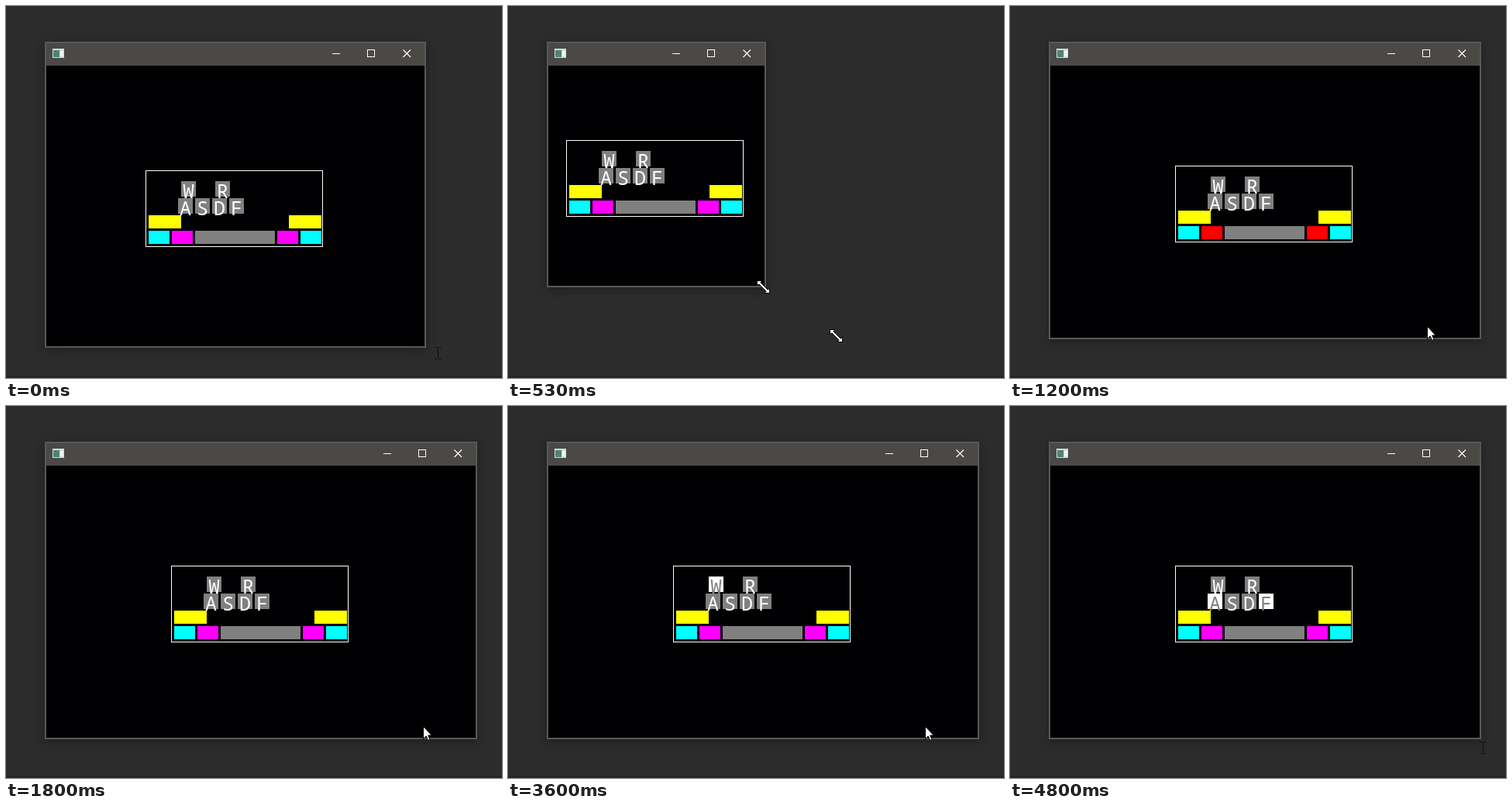
These frames come from a looping animation (640x480 px, 4860 ms). An HTML page:

```html
<!DOCTYPE html>
<html lang="en">
<head>
<meta charset="utf-8">
<title>Key display</title>
<style>
html, body { margin: 0; width: 100%; height: 100%; overflow: hidden; background: #2c2c2c; }
#stage { position: absolute; left: 0; top: 0; width: 640px; height: 480px; overflow: hidden; background: #2c2c2c; }
#strip { position: absolute; left: 0; top: 477px; width: 640px; height: 3px; background: #2a2527; }
#win { position: absolute; left: 50px; top: 46px; box-sizing: border-box; border: 2px solid #585858; background: #000002; box-shadow: 0 3px 13px rgba(0, 0, 0, .32); }
#bar { position: absolute; left: 0; right: 0; top: 0; height: 29px; background: #4a4945; }
#bar svg { position: absolute; top: 0; }
#icon { left: 0; }
#buttons { right: 0; fill: none; stroke: #fff; }
#panel { position: absolute; width: 229px; height: 99px; box-shadow: inset 0 0 0 1px #fff; }
.key { position: absolute; background: var(--up); color: #fff; text-align: center; white-space: pre;
  font: 500 25px/20px "Noto Sans Mono", "DejaVu Sans Mono", monospace; }
.key span { position: absolute; left: -5px; right: -5px; top: 2px; }
.key.down { background: var(--down); color: #808080; }
.cursor { position: absolute; left: 0; top: 0; width: 1px; height: 1px; overflow: visible; visibility: hidden; }
</style>
</head>
<body>
<div id="stage">
  <div id="strip"></div>
  <div id="win">
    <div id="bar">
      <svg id="icon" width="30" height="29" shape-rendering="crispEdges">
        <rect x="8" y="7" width="15" height="12" fill="#d4d8d8"/>
        <rect x="9" y="9" width="8" height="9" fill="#4c8478"/>
        <rect x="18" y="10" width="4" height="7" fill="#f2f2f2"/>
      </svg>
      <svg id="buttons" width="120" height="29">
        <path d="M1 13.5h10M46.5 8.5h9v9h-9z" shape-rendering="crispEdges"/>
        <path d="M92.5 8.5l9.5 9.5M102 8.5l-9.5 9.5" stroke-width="1.2"/>
      </svg>
    </div>
    <div id="panel"></div>
  </div>
  <svg class="cursor" id="beam">
    <path d="M-3.5-7.5h3M1.5-7.5h3M.5-7v14M-3.5 7.5h3M1.5 7.5h3" fill="none" stroke="#0c0c0c"/>
  </svg>
  <svg class="cursor" id="arrow">
    <path d="M.5.5v16l3.7-3.6 2.5 5.6 2.4-1-2.4-5.5h4.6z" fill="#fff" stroke="#000"/>
  </svg>
  <svg class="cursor" id="size">
    <path id="diag" d="M-8-8h6.5l-2.2 2.2 9.5 9.5L8 1.5V8H1.5l2.2-2.2-9.5-9.5L-8-1.5z" fill="#fff" stroke="#000"/>
  </svg>
  <svg class="cursor" id="trail">
    <use href="#diag"/>
  </svg>
</div>
<script>
const LOOP = 4860;
const $ = id => document.getElementById(id);

// name, x, y, width, height, colour up, colour down
const GREY = '#808080', WHITE = '#fff';
const letter = (name, x, y) => [name, x, y, 19, 20, GREY, WHITE];
const layout = [
  letter('W', 46, 14), letter('R', 90, 14),
  letter('A', 42, 36), letter('S', 64, 36), letter('D', 86, 36), letter('F', 108, 36),
  ...[4, 185].map(x => ['shift', x, 58, 42, 17, '#ff0', '#0f0']),
  ...[4, 200].map(x => ['ctrl', x, 78, 27, 17, '#0ff', '#00f']),
  ...[34, 170].map(x => ['alt', x, 78, 27, 17, '#f0f', '#f00']),
  ['space', 64, 78, 103, 17, GREY, WHITE]
];

const keys = layout.map(([name, x, y, w, h, up, down]) => {
  const el = document.createElement('div');
  el.className = 'key';
  el.style.cssText = `left:${x}px;top:${y}px;width:${w}px;height:${h}px;--up:${up};--down:${down}`;
  if (name.length === 1) {
    const label = document.createElement('span');
    label.textContent = name;
    el.append(label);
  }
  $('panel').append(el);
  return { name, el };
});

// time, keys held
const held = [
  [0, ''], [1200, 'alt'], [1330, 'ctrl'], [1400, ''], [1600, 'ctrl'], [1660, 'alt'], [1800, ''],
  [1860, 'space'], [1930, ''], [2000, 'space'], [2060, ''], [2130, 'space'], [2200, ''],
  [2330, 'shift'], [2400, ''], [2460, 'shift'], [2600, ''],
  [3000, 'A'], [3060, 'S'], [3130, ''],
  [3330, 'A'], [3400, 'S'], [3460, 'D'],
  [3600, 'W'], [3660, 'A'], [3730, 'S'], [3800, ''],
  [4000, 'R'], [4200, ''], [4330, 'F'], [4400, ''], [4530, 'A'], [4600, 'A F'], [4660, ''],
  [4730, 'A'], [4800, 'A F']
];

// time, right edge, bottom edge
const sizes = [
  [0, 542, 441], [400, 503, 441], [460, 426, 427], [530, 333, 363], [600, 352, 358],
  [660, 432, 390], [730, 530, 425], [800, 597, 432], [860, 608, 430]
];

// time, shape, x, y; without a place the pointer holds the window corner
const pointer = [
  [0, 'beam', 557, 448], [60, 'beam', 552, 449], [130, 'size', 541, 442], [200, 'size', 540, 441],
  [400, 'size'], [860, 'arrow', 538, 413], [3800, 'arrow', 537, 412],
  [4200, 'arrow', 545, 415], [4260, 'arrow', 562, 419], [4330, 'arrow', 584, 423],
  [4400, 'size', 605, 429], [4460, 'beam', 613, 442], [4530, 'beam', 618, 452],
  [4600, 'beam', 619, 456], [4660, 'beam', 618, 453], [4730, 'beam', 614, 447],
  [4800, 'beam', 610, 441]
];

const at = (track, t) => track.findLast(step => step[0] <= t);

function place(id, x, y) {
  $(id).style.visibility = 'visible';
  $(id).style.transform = `translate(${x}px, ${y}px)`;
}

function draw(t) {
  const [, right, bottom] = at(sizes, t);
  $('win').style.width = right - 50 + 'px';
  $('win').style.height = bottom - 46 + 'px';
  $('panel').style.left = Math.floor((right - 182) / 2) - 52 + 'px';
  $('panel').style.top = Math.floor((bottom - 17) / 2) - 48 + 'px';

  const down = at(held, t)[1].split(' ');
  for (const { name, el } of keys) el.classList.toggle('down', down.includes(name));

  for (const el of document.querySelectorAll('.cursor')) el.style.visibility = 'hidden';
  const [, shape, x = right - 3.5, y = bottom - .5] = at(pointer, t);
  place(shape, x, y);
  if (t >= 530 && t < 600) place('trail', 423.5, 425.5);
}

const start = performance.now();
function tick() {
  draw((performance.now() - start) % LOOP);
  requestAnimationFrame(tick);
}
tick();
</script>
</body>
</html>
```
